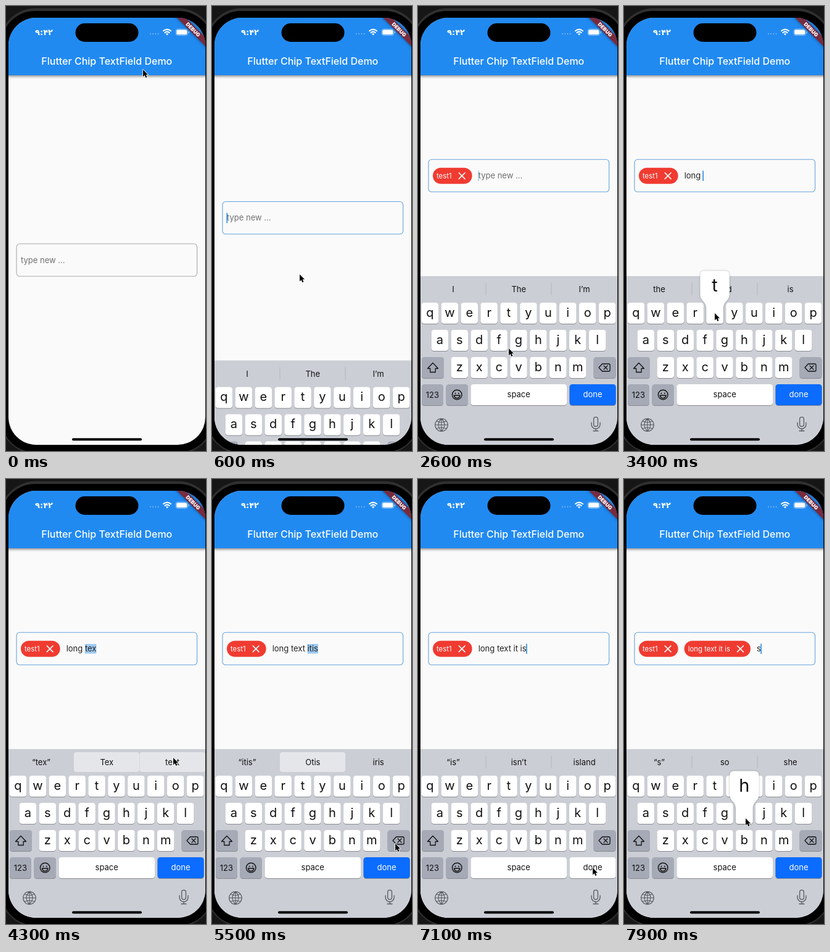
An HTML page with a canvas that plays this animation: 324x720 px, repeating every 8000 ms.

```html
<!DOCTYPE html>
<html lang="en">
<head>
<meta charset="utf-8">
<title>Chip text field</title>
<style>
html, body { margin: 0; width: 100%; height: 100%; overflow: hidden; background: #161616; }
canvas { display: block; width: 324px; height: 720px; }
</style>
</head>
<body>
<canvas></canvas>
<script>
const LOOP = 8000, STEP = 100, HOLD = 100;
const canvas = document.querySelector('canvas');
const g = canvas.getContext('2d');
const dpr = window.devicePixelRatio || 1;
canvas.width = 324 * dpr;
canvas.height = 720 * dpr;

const BLUE = '#218af1', KEY_GREY = '#a5aab6', INK = '#111';
const LETTERS = ['qwertyuiop', 'asdfghjkl', 'zxcvbnm'];
const DIGITS = ['1234567890', '-/:;()$&@"', '.,?!’'];

// time, key, optional pointer position
const EVENTS = [
  [0, '', 222, 103], [380, 'field', 140, 409],
  [820, 't'], [980, 'e'], [1150, 's'], [1360, 't', 146, 494],
  [1640, 'mode'], [1800, '1'], [2010, 'done'], [2590, '', 147, 554],
  [2760, 'l'], [2880, 'o'], [3010, 'n'], [3140, 'g'], [3260, 'space'],
  [3400, 't'], [3520, 'e'], [3640, 'x'], [4260, 'pick', 271, 451],
  [4480, 'i'], [4600, 't'], [4720, 'i'], [4850, 's'],
  [5490, '', 297, 590], [5620, 'back', 297, 590], [6020, 'back', 297, 590],
  [6360, 'space', 168, 628], [6620, 'i'], [6800, 's'], [7060, 'done'],
  [7460, 's'], [7860, 'h', 197, 549]
];

// word: middle suggestion, right suggestion, autocorrect offered
const SUGGEST = {
  t: ['to', 'the'], te: ['tell', 'test'], tes: ['Tes', 'test', true],
  test: ['tests', 'testing'], test1: ['test', 'tests'],
  l: ['love', 'like'], lo: ['love', 'lol'], lon: ['long', 'Lon'], long: ['longer', 'longest'],
  tex: ['Tex', 'text', true], i: ['I', 'in'], it: ['it’s', 'it’ll'], iti: ['it', 'its', true],
  itis: ['Otis', 'iris', true], is: ['isn’t', 'island'], s: ['so', 'she']
};

const SPECIAL = {
  shift: [6, 568, 36], back: [284.5, 568, 36], mode: [6, 612, 35],
  emoji: [45.5, 612, 35.5], space: [85.5, 612, 155.5], done: [245.5, 612, 75]
};

const clamp = x => Math.max(0, Math.min(1, x));
const ease = x => { x = clamp(x); return x * x * (3 - 2 * x); };

function fillBox(x, y, w, h, r, color) {
  g.beginPath();
  g.roundRect(x, y, w, h, r);
  g.fillStyle = color;
  g.fill();
}

function setFont(size, weight = 400) {
  g.font = `${weight} ${size}px Inter, Roboto, sans-serif`;
}

function label(s, x, y, size, color = INK, align = 'center', weight = 400) {
  setFont(size, weight);
  g.textAlign = align;
  g.fillStyle = color;
  g.fillText(s, x, y);
}

function width(s, size) {
  setFont(size);
  return g.measureText(s).width;
}

function strokePath(d, x, y, color, lineWidth) {
  g.save();
  g.translate(x, y);
  g.strokeStyle = color;
  g.lineWidth = lineWidth;
  g.lineCap = g.lineJoin = 'round';
  g.stroke(new Path2D(d));
  g.restore();
}

function charKeys(rows) {
  const keys = {};
  rows.forEach((row, r) => {
    const pitch = row.length === 5 ? 44.8 : 31.9;
    [...row].forEach((c, i) => {
      keys[c] = { x: 163 + (i - (row.length - 1) / 2) * pitch, y: 480 + 44 * r, w: pitch - 4.4 };
    });
  });
  return keys;
}
const letterKeys = charKeys(LETTERS), digitKeys = charKeys(DIGITS);

const pointer = EVENTS.map(([t, key, x, y]) => {
  if (x === undefined) {
    const c = letterKeys[key] || digitKeys[key], s = SPECIAL[key];
    x = c ? c.x : s[0] + s[2] / 2;
    y = (c ? c.y : s[1]) + 17;
  }
  return { t, x, y };
});

function pointerAt(t) {
  let i = pointer.length - 1;
  while (pointer[i].t > t) i--;
  const a = pointer[i], b = pointer[i + 1] || a;
  const start = Math.max(a.t + HOLD, b.t - 500);
  const k = b === a ? 0 : ease((t - start) / Math.max(1, b.t - start));
  return { x: a.x + (b.x - a.x) * k, y: a.y + (b.y - a.y) * k };
}

function stateAt(t) {
  const s = { text: '', chips: [], digits: false, focus: false, edited: 0, pressed: '' };
  for (const [start, key] of EVENTS) {
    if (start > t) break;
    if (t < start + HOLD) { s.pressed = key; break; }
    if (!key) continue;
    s.edited = start + HOLD;
    if (key === 'field') s.focus = true;
    else if (key === 'mode') s.digits = !s.digits;
    else if (key === 'back') s.text = s.text.slice(0, -1);
    else if (key === 'space') s.text += ' ';
    else if (key === 'pick') s.text = s.text.replace(/\S*$/, 'text ');
    else if (key === 'done') { s.chips.push(s.text); s.text = ''; s.digits = false; }
    else s.text += key;
  }
  s.word = s.text.match(/\S*$/)[0];
  s.correct = !!(SUGGEST[s.word] || [])[2];
  return s;
}

function drawField(s, t, slide) {
  g.save();
  g.translate(0, 136.5 * (1 - slide));
  g.beginPath();
  g.roundRect(17, 248.3, 292.5, 52.5, 5);
  g.strokeStyle = s.focus ? '#68a5dd' : '#aaa';
  g.lineWidth = 1.1;
  g.stroke();

  let x = 24;
  for (const chip of s.chips) {
    const w = width(chip, 11.4) + 39;
    fillBox(x, 261.7, w, 26, 13, '#f03b31');
    label(chip, x + 6, 278.7, 11.4, '#fff', 'left');
    strokePath('M-4.8-4.8 4.8 4.8M4.8-4.8-4.8 4.8', x + w - 16.5, 274.8, '#fff', 1.7);
    x += w + 10;
  }
  const end = x + width(s.text, 13);
  if (s.correct) {
    const w = width(s.word, 13);
    g.fillStyle = '#9dc9f2';
    g.fillRect(end - w, 267, w, 15.5);
  }
  label(s.text || 'type new ...', x, 279.2, 13, s.text ? '#222' : '#707070', 'left');
  if (s.focus) {
    const phase = (t - s.edited) % 1000;
    g.globalAlpha = phase < 900 ? 1 - clamp((phase - 400) / 150) : (phase - 900) / 100;
    g.fillStyle = '#2b8be6';
    g.fillRect(end - .5, 266.5, 1.6, 16.5);
  }
  g.restore();
}

function drawKey(x, y, w, color) {
  fillBox(x, y + 1, w, 34, 4.3, '#898b90');
  fillBox(x, y, w, 34, 4.3, color);
}

function drawPopup(c, { x, y, w }) {
  const top = y - 51.5, h = w / 2, b = 23.7;
  g.save();
  g.shadowColor = 'rgba(0,0,0,.3)';
  g.shadowBlur = 3 * dpr;
  g.beginPath();
  g.moveTo(x - b, top + 7);
  g.quadraticCurveTo(x - b, top, x - b + 7, top);
  g.lineTo(x + b - 7, top);
  g.quadraticCurveTo(x + b, top, x + b, top + 7);
  g.lineTo(x + b, top + 37);
  g.bezierCurveTo(x + b, top + 50, x + h, top + 48, x + h, top + 62);
  g.lineTo(x + h, y + 30);
  g.quadraticCurveTo(x + h, y + 34, x + h - 4, y + 34);
  g.lineTo(x - h + 4, y + 34);
  g.quadraticCurveTo(x - h, y + 34, x - h, y + 30);
  g.lineTo(x - h, top + 62);
  g.bezierCurveTo(x - h, top + 48, x - b, top + 50, x - b, top + 37);
  g.closePath();
  g.fillStyle = '#fff';
  g.fill();
  g.restore();
  label(c, x, top + 33, 29);
}

function drawSuggestions(s) {
  const [mid, right] = SUGGEST[s.word] || (s.text ? ['and', 'is'] : ['The', 'I’m']);
  const left = s.word ? `“${s.word}”` : s.text ? 'the' : 'I';
  if (s.correct) {
    fillBox(110, 442, 106, 32, 4, '#e5e6ea');
    if (s.pressed === 'pick') fillBox(216.5, 442, 106, 32, 4, '#e5e6ea');
  } else {
    g.fillStyle = '#b3b6bd';
    g.fillRect(109.5, 448, 1, 20);
    g.fillRect(215.5, 448, 1, 20);
  }
  [left, mid, right].forEach((word, i) => label(word, 57 + 106.3 * i, 463, 13));
}

function drawKeyboard(s, slide) {
  g.save();
  g.translate(0, 273 * (1 - slide));
  g.fillStyle = '#cbced5';
  g.fillRect(0, 437, 324, 283);
  drawSuggestions(s);

  const keys = s.digits ? digitKeys : letterKeys;
  for (const c in keys) {
    const k = keys[c];
    drawKey(k.x - k.w / 2, k.y, k.w, '#fff');
    label(c, k.x, k.y + 22.7, 20);
  }
  for (const name in SPECIAL) {
    const light = (name === 'space') !== (s.pressed === name);
    const color = name === 'done' && s.pressed !== name ? '#0b6cff' : light ? '#fff' : KEY_GREY;
    drawKey(...SPECIAL[name], color);
  }
  if (s.digits) label('#+=', 24, 589.5, 13);
  else strokePath('M0-8 8.5 1H4.2V7H-4.2V1H-8.5Z', 24, 585.5, INK, 1.3);
  strokePath('M-9 0-3.5-6H7Q9-6 9-4V4Q9 6 7 6H-3.5ZM-1-3 5 3M5-3-1 3', 302, 585, INK, 1.3);
  label(s.digits ? 'ABC' : '123', 23.3, 633.5, 13);
  label('space', 163.2, 633, 13);
  label('done', 283, 633, 13, s.pressed === 'done' ? INK : '#fff');

  strokePath('M7.8 0A7.8 7.8 0 1 1-7.8 0A7.8 7.8 0 1 1 7.8 0', 63.2, 629, INK, 1.4);
  strokePath('M-2.7-2.8v1M2.7-2.8v1M-4.8 1H4.8Q4 5.5 0 5.5T-4.8 1Z', 63.2, 629, INK, 1.5);
  strokePath('M10.3 0A10.3 10.3 0 1 1-10.3 0A10.3 10.3 0 1 1 10.3 0M0-10.3V10.3M-10.3 0H10.3' +
    'M0-10.3Q-10 0 0 10.3M0-10.3Q10 0 0 10.3M-8-6Q0-2.5 8-6M-8 6Q0 2.5 8 6', 38, 677.8, '#555960', 1.1);
  strokePath('M-3.4-7.5A3.4 3.4 0 0 1 3.4-7.5V1A3.4 3.4 0 0 1-3.4 1Z' +
    'M-7-2V1A7 7 0 0 0 7 1V-2M0 8V11.5M-4 11.5H4', 288, 676, '#555960', 1.3);
  if (keys[s.pressed]) drawPopup(s.pressed, keys[s.pressed]);
  g.restore();
}

function drawAppBar() {
  g.save();
  g.shadowColor = 'rgba(0,0,0,.45)';
  g.shadowBlur = 4 * dpr;
  g.shadowOffsetY = 1.5 * dpr;
  g.fillStyle = BLUE;
  g.fillRect(0, 10, 330, 102);
  g.restore();

  fillBox(112.5, 28, 102, 30, 15, '#000');
  g.textAlign = 'center';
  g.fillStyle = '#fff';
  g.font = '600 13px "DejaVu Sans", sans-serif';
  g.fillText('۹:۴۲', 61.5, 47);
  label('Flutter Chip TextField Demo', 163.3, 95, 16, '#fff', 'center', 500);

  for (let i = 0; i < 4; i++) fillBox(233 + i * 4.2, 44, 2, 2, 1, 'rgba(255,255,255,.4)');
  strokePath('M-6-5.2Q0-10 6-5.2M-3.6-2.4Q0-5.4 3.6-2.4', 261, 45.5, '#fff', 2);
  g.beginPath();
  g.moveTo(261, 47.5);
  g.lineTo(258.8, 45);
  g.quadraticCurveTo(261, 43.3, 263.2, 45);
  g.fillStyle = '#fff';
  g.fill();
  g.beginPath();
  g.roundRect(275, 37.3, 19.5, 10.2, 3.2);
  g.strokeStyle = 'rgba(255,255,255,.5)';
  g.lineWidth = .9;
  g.stroke();
  fillBox(276.2, 38.5, 17.1, 7.8, 2, '#fff');
  fillBox(295.6, 40.8, 1.3, 3.4, .7, 'rgba(255,255,255,.6)');
}

function drawBanner() {
  g.save();
  g.translate(303, 38);
  g.rotate(Math.PI / 4);
  g.shadowColor = 'rgba(0,0,0,.5)';
  g.shadowBlur = 5 * dpr;
  g.fillStyle = '#792b3e';
  g.fillRect(-50, -4.9, 100, 9.8);
  g.shadowColor = 'transparent';
  label('DEBUG', 0, 3, 8.3, '#fff', 'center', 900);
  g.restore();
}

function drawPointer({ x, y }) {
  const arrow = new Path2D('M0 0V11.4L2.6 9 4.4 13 6.4 12.1 4.7 8.2H8.1Z');
  g.save();
  g.translate(x, y);
  g.lineJoin = 'round';
  g.lineWidth = 1.6;
  g.strokeStyle = '#fff';
  g.stroke(arrow);
  g.fillStyle = '#000';
  g.fill(arrow);
  g.restore();
}

function draw(t) {
  const s = stateAt(t), slide = ease((t - 450) / 300);
  g.setTransform(dpr, 0, 0, dpr, 0, 0);
  g.fillStyle = '#161616';
  g.fillRect(0, 0, 324, 720);
  fillBox(-10, 3.5, 347, 721, 58, '#303030');
  fillBox(-8, 8, 343, 714, 55, '#000');

  g.save();
  g.beginPath();
  g.roundRect(4, 19, 319, 691, 45);
  g.clip();
  g.fillStyle = '#fafafa';
  g.fillRect(0, 0, 324, 720);
  drawAppBar();
  drawBanner();
  drawField(s, t, slide);
  if (slide > 0) drawKeyboard(s, slide);
  fillBox(107, 699.3, 113, 4, 2, '#000');
  g.restore();
  drawPointer(pointerAt(t));
}

const begin = performance.now();
function frame() {
  const t = (performance.now() - begin) % LOOP;
  draw(Math.floor(t / STEP) * STEP);
  requestAnimationFrame(frame);
}
frame();
</script>
</body>
</html>
```
